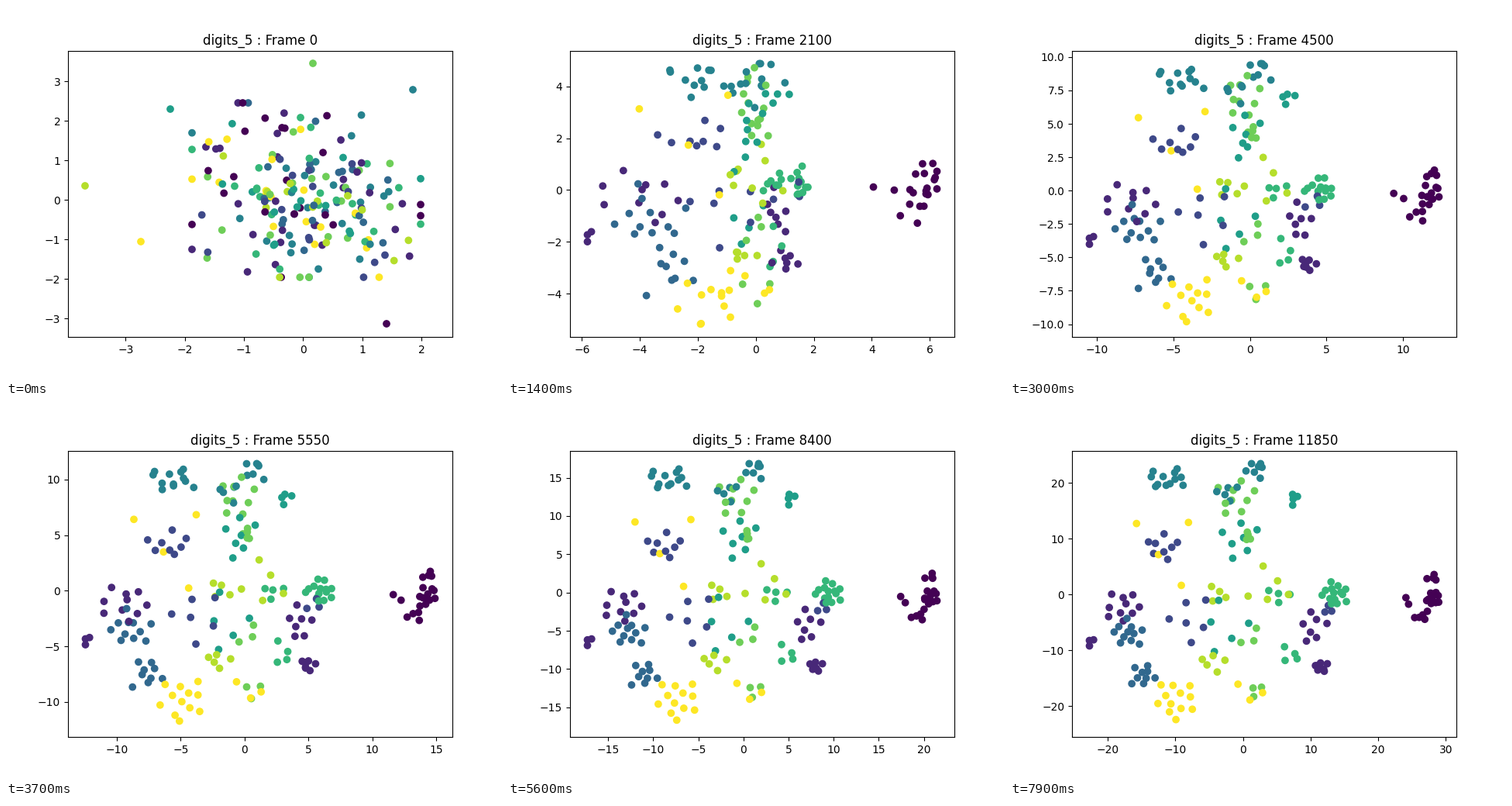
A matplotlib script that plays this animation: 640 px wide and 480 px high, repeating every 8000 ms.

```python
import numpy as np
import matplotlib.pyplot as plt
from matplotlib.animation import FuncAnimation

FRAMES, STEP_MS, ITERS = 80, 100, 150
SETTLE = 14                          # frames until the clusters separate
LEFT, RIGHT, BOTTOM, TOP = 80, 576, 427.2, 57.6    # axes box in pixels

# Axis limits at a few moments; between them they grow like k ** 0.88
KEY_T = np.array([0, SETTLE, 45, 79])
XMIN = (-3.975, -6.41, -16.24, -25.27)
XMAX = (2.525, 6.85, 19.34, 31.55)
YMIN = (-3.475, -5.68, -15.6, -25.55)
YMAX = (3.78, 5.38, 14.95, 25.8)

# Final clusters of each digit: count, x, y, radius in pixels
CLUSTERS = {
    0: [(2, 512, 250, 5), (5, 531, 272, 9), (10, 546, 250, 9), (4, 547, 221, 8)],
    1: [(3, 105, 303, 6), (10, 145, 258, 24), (7, 402, 338, 10), (7, 393, 287, 22)],
    2: [(8, 196, 182, 22), (6, 232, 272, 34), (3, 410, 263, 6)],
    3: [(11, 153, 293, 20), (9, 171, 349, 18)],
    4: [(6, 190, 94, 13), (6, 215, 92, 14), (7, 315, 78, 15), (5, 280, 114, 18)],
    5: [(4, 367, 120, 8), (7, 296, 170, 28), (5, 280, 288, 42)],
    6: [(14, 420, 243, 17), (4, 345, 245, 16), (4, 360, 322, 14)],
    7: [(9, 291, 117, 28), (5, 305, 168, 7), (3, 310, 302, 18), (3, 318, 366, 10)],
    8: [(5, 337, 232, 34), (4, 266, 242, 14), (5, 260, 332, 18)],
    9: [(4, 212, 183, 62), (12, 215, 379, 28), (3, 306, 370, 22)],
}

# Lone dots at the rim of the starting cloud
OUTLIERS = {0: (491, 410), 4: (525, 108), 5: (212, 133),
            7: (396, 74), 8: (102, 232), 9: (174, 304)}

rng = np.random.default_rng(5)


def disc(n, x, y, radius):
    """Evenly fill a disc along a golden-angle spiral, slightly shaken."""
    i = np.arange(n)
    r = radius * np.sqrt((i + 0.5) / n)
    a = i * np.pi * (3 - np.sqrt(5)) + rng.uniform(0, 2 * np.pi)
    pts = np.column_stack([x + r * np.cos(a), y + r * np.sin(a)])
    return pts + rng.normal(0, 1.5, pts.shape)


def keep_inside(pts):
    return np.clip(pts, (102.5, 74.4), (553.5, 410.4))


labels, homes, spread = [], [], []
for digit, clusters in CLUSTERS.items():
    for cluster in clusters:
        pts = disc(*cluster)
        labels.extend([digit] * len(pts))
        homes.extend(pts)
        spread.extend(pts - cluster[1:3])
labels, homes, spread = map(np.array, (labels, homes, spread))

# Early on, clusters are looser and lean towards the middle
x, y = homes.T
lean = np.column_stack([-18 * np.sin(np.pi * (x - 328) / 225),
                        -6 * np.sin(np.pi * (y - 74) / 336)])
drifts = lean + 0.2 * spread + rng.normal(0, 3.5, homes.shape)

starts = np.clip(rng.normal((380, 248), (76, 56), homes.shape),
                 (240, 125), (535, 350))
for digit, spot in OUTLIERS.items():
    starts[np.argmax(labels == digit)] = spot

order = rng.permutation(len(labels))
labels, homes, drifts, starts = (a[order] for a in (labels, homes, drifts, starts))


def settled(k):
    fade = (83 / (k + 4) - 1) / (83 / 34 - 1)
    return keep_inside(homes + drifts * fade)


def positions(k):
    if k >= SETTLE:
        return settled(k)
    ease = 1 - (1 - k / SETTLE) ** 1.5
    return starts + (settled(SETTLE) - starts) * ease


def limits(k):
    grow = 0.88
    return [np.interp(k ** grow, KEY_T ** grow, v) for v in (XMIN, XMAX, YMIN, YMAX)]


def to_data(px, x0, x1, y0, y1):
    u, v = (px - (LEFT, BOTTOM)).T / [[RIGHT - LEFT], [TOP - BOTTOM]]
    return np.column_stack([x0 + u * (x1 - x0), y0 + v * (y1 - y0)])


fig, ax = plt.subplots(figsize=(6.4, 4.8), dpi=100)
dots = ax.scatter(*starts.T, c=labels, cmap="viridis", vmin=0, vmax=9)


def update(k):
    x0, x1, y0, y1 = limits(k)
    ax.set(xlim=(x0, x1), ylim=(y0, y1))
    ax.set_title(f"digits_5 : Frame {k * ITERS}")
    dots.set_offsets(to_data(positions(k), x0, x1, y0, y1))
    return (dots,)


anim = FuncAnimation(fig, update, frames=FRAMES, interval=STEP_MS,
                     repeat=True, repeat_delay=0, blit=False)
plt.show()
```
